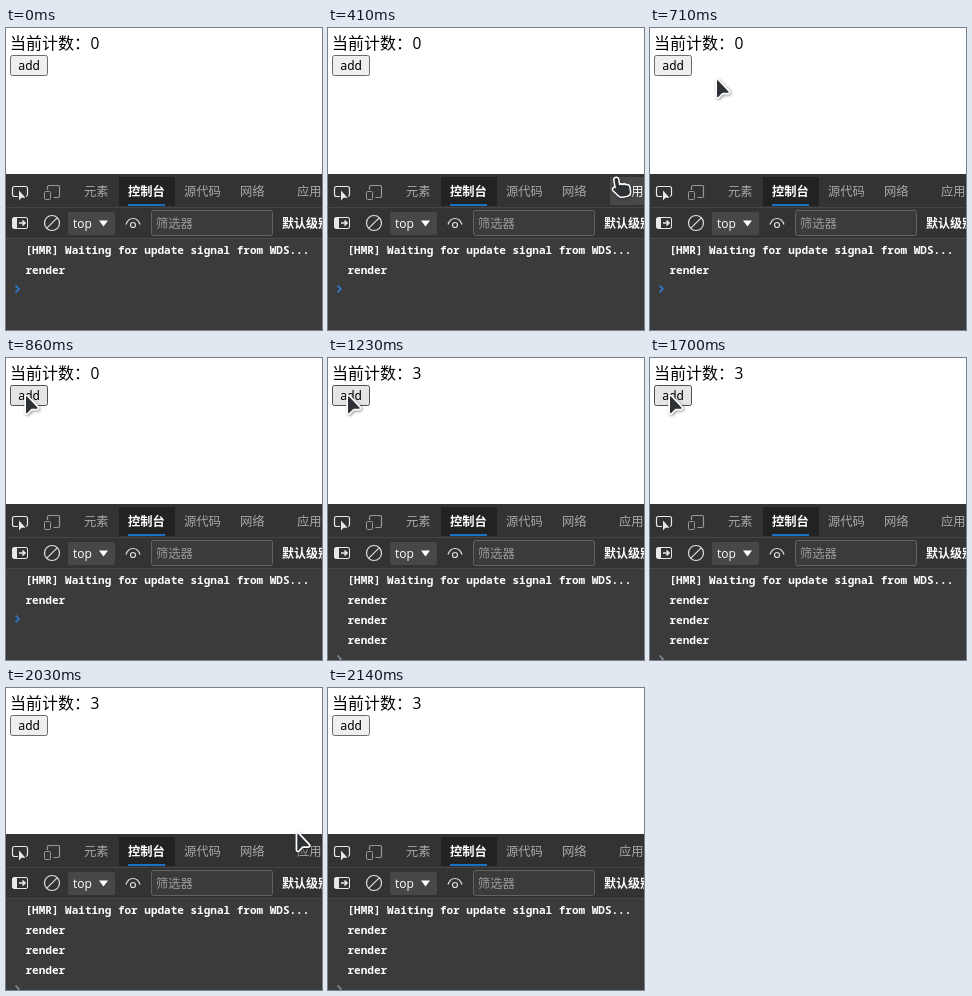
An HTML page with a canvas that plays this animation: 316x302 px, repeating every 3.64 s.

```html
<!DOCTYPE html>
<html lang="zh-CN">
<head>
<meta charset="utf-8">
<title>Counter</title>
<style>
html, body { margin: 0; width: 100%; height: 100%; overflow: hidden; background: #fff; }
canvas { display: block; width: 100vw; height: 100vh; }
</style>
</head>
<body>
<canvas id="stage"></canvas>
<script>
const W = 316, H = 302, LOOP = 3640, STEP = 30;
const SANS = '"Open Sans", "Noto Sans CJK SC", "Noto Sans CJK", sans-serif';
const CJK = '"Noto Sans CJK SC", "Noto Sans CJK", sans-serif';
const MONO = '"Noto Sans Mono", "DejaVu Sans Mono", monospace';

const canvas = document.getElementById('stage');
const ctx = canvas.getContext('2d');

// Pointer keys: time, x, y
const enter = [[410, 288, 150], [470, 236, 125], [560, 150, 88], [710, 67, 52], [800, 31, 41], [860, 20, 38]];
const leave = [[1680, 20, 38], [1740, 46, 45], [1810, 130, 65], [1890, 238, 90], [1980, 283, 133], [2060, 300, 164], [2130, 312, 186]];

function slope(keys, i, axis) {
  const a = keys[Math.max(i - 1, 0)], b = keys[Math.min(i + 1, keys.length - 1)];
  return (b[axis] - a[axis]) / (b[0] - a[0]);
}

function follow(keys, t) {
  const last = keys.length - 1;
  if (t <= keys[0][0]) return keys[0].slice(1);
  if (t >= keys[last][0]) return keys[last].slice(1);
  let i = 0;
  while (t >= keys[i + 1][0]) i++;
  const a = keys[i], b = keys[i + 1], d = b[0] - a[0], u = (t - a[0]) / d;
  const u2 = u * u, u3 = u2 * u;
  return [1, 2].map(k =>
    (2 * u3 - 3 * u2 + 1) * a[k] + (3 * u2 - 2 * u3) * b[k] +
    d * ((u3 - 2 * u2 + u) * slope(keys, i, k) + (u3 - u2) * slope(keys, i + 1, k)));
}

function pointerAt(t) {
  if (t < 410 || t >= 2140) return null;
  if (t < 1700) return follow(enter, 410 + Math.floor((t - 410) / STEP) * STEP);
  return follow(leave, Math.floor(t / STEP) * STEP);
}

function text(str, x, y, size, color, family = SANS, weight = 400) {
  ctx.font = `${weight} ${size}px ${family}`;
  ctx.fillStyle = color;
  ctx.fillText(str, x, y);
}

function rect(x, y, w, h, color) {
  ctx.fillStyle = color;
  ctx.fillRect(x, y, w, h);
}

function box(x, y, w, h, r, fill, line) {
  ctx.beginPath();
  ctx.roundRect(x, y, w, h, r);
  if (fill) { ctx.fillStyle = fill; ctx.fill(); }
  if (line) { ctx.strokeStyle = line; ctx.lineWidth = 1; ctx.stroke(); }
}

function stroke(d, color, width = 1.2) {
  ctx.strokeStyle = color;
  ctx.lineWidth = width;
  ctx.stroke(new Path2D(d));
}

function fill(d, color) {
  ctx.fillStyle = color;
  ctx.fill(new Path2D(d));
}

function drawPage(t, hover) {
  rect(0, 0, W, 146, '#fff');
  text('当前计数：', 4, 21, 16, '#000', CJK, 300);
  text(t < 1080 ? '0' : '3', 84.5, 21, 15.5, '#000');
  const pressed = hover && t >= 960 && t < 1080;
  const [face, edge] = pressed ? ['#f5f5f5', '#8d8d8d'] : hover ? ['#e5e5e5', '#4f4f4f'] : ['#efefef', '#6b6b6b'];
  box(4.5, 27.5, 37, 20, 2, face, edge);
  text('add', 12, 42, 12.2, '#000', MONO);
}

function drawTabs(hover) {
  rect(0, 146, W, 33, '#333');
  rect(113, 149, 56, 29, '#222');
  if (hover) rect(282, 149, 34, 28, '#484848');
  const tabs = [['元素', 78], ['控制台', 122], ['源代码', 178], ['网络', 234], ['应用', 291]];
  for (const [label, x] of tabs) {
    const on = x === 122;
    const color = on || (hover && x === 291) ? '#fff' : '#a8a8a8';
    text(label, x, 168, 12.3, color, CJK, on ? 700 : 400);
  }
  rect(122, 176, 37, 2, '#1b72c5');

  // Inspect and device icons
  stroke('M12 168.5H8.5Q6.5 168.5 6.5 166.5V160.5Q6.5 158.5 8.5 158.5H19.5Q21.5 158.5 21.5 160.5V166.5Q21.5 168 20 168.5', '#e8e8e8');
  fill('M13 162.5V172.5L15.5 169.8H19.5Z', '#e8e8e8');
  stroke('M41.5 162V159Q41.5 157.5 43 157.5H52Q53.5 157.5 53.5 159V168Q53.5 169.5 52 169.5H47.5', '#999');
  box(38.5, 163.5, 6, 8, 1, null, '#999');
}

function drawToolbar() {
  rect(0, 179, W, 32, '#333');
  rect(0, 179, W, 1, '#444');
  rect(0, 210, W, 1, '#484848');

  box(6.5, 189.5, 15, 11, 1.5, null, '#e8e8e8');
  rect(7, 190, 4, 10, '#e8e8e8');
  stroke('M13 195H19M16.5 192.5L19 195L16.5 197.5', '#e8e8e8', 1.6);
  stroke('M53.5 195A7.5 7.5 0 1 1 38.5 195A7.5 7.5 0 1 1 53.5 195M40.8 200.2L51.2 189.8', '#e0e0e0');

  box(62, 184, 47, 23, 2, '#474747');
  text('top', 67, 200, 12, '#fff', SANS, 500);
  fill('M93 192.5H102L97.5 198.5Z', '#fff');

  stroke('M120 196.5Q122 190.5 127 190.5T134 196.5', '#ddd');
  stroke('M129.5 197A2.5 2.5 0 1 1 124.5 197A2.5 2.5 0 1 1 129.5 197', '#ddd');

  box(145.5, 182.5, 121, 25, 2, '#3b3b3b', '#626262');
  text('筛选器', 150, 200, 12.3, '#999', CJK);
  text('默认级别', 276, 200, 12, '#fff', CJK, 700);
}

function drawConsole(t) {
  rect(0, 211, W, H - 211, '#3b3b3b');
  const done = t >= 1110;
  const lines = ['[HMR] Waiting for update signal from WDS...'].concat(Array(done ? 3 : 1).fill('render'));
  lines.forEach((line, i) => text(line, 19.5, 226 + i * 20, 11, '#fff', MONO, 600));
  const y = 221 + lines.length * 20;
  stroke(`M9.5 ${y - 3.5}L13 ${y}L9.5 ${y + 3.5}`, t >= 1230 ? '#777f88' : '#2f74c0', 1.8);
}

const ARROW = 'M0 .5V16.5Q.4 17.8 1.5 16.7L4.6 13.4Q5.2 12.8 6 12.8H11Q12.4 12.6 11.4 11.5L1 .6Q0 0 0 .5Z';
const HAND = 'M-2 2Q-2 0 0 0T2 2V9Q4 7.5 5.7 9.4Q8 8.2 9.5 10.2Q13 9.6 13 13V17Q13 22 8 22H3.5Q1 22 -.5 19.5L-5 13.5Q-6 11.5 -4.2 10.8Q-3 10.5 -2 12Z';

function drawPointer(x, y, hand) {
  const shape = new Path2D(hand ? HAND : ARROW);
  ctx.save();
  ctx.translate(x, y);
  if (hand) {
    ctx.rotate(-.17);
    ctx.scale(.88, .88);
  }
  ctx.lineJoin = 'round';
  ctx.shadowColor = 'rgba(0,0,0,.4)';
  ctx.shadowBlur = 3;
  ctx.shadowOffsetX = ctx.shadowOffsetY = 1;
  ctx.strokeStyle = '#fff';
  ctx.lineWidth = 3.4;
  ctx.stroke(shape);
  ctx.shadowColor = 'transparent';
  ctx.fillStyle = '#2d3136';
  ctx.fill(shape);
  ctx.restore();
}

function draw(t) {
  const p = pointerAt(t);
  const over = (x0, y0, x1, y1) => !!p && p[0] >= x0 && p[0] <= x1 && p[1] >= y0 && p[1] <= y1;
  const onTab = over(282, 147, W, 178);
  drawPage(t, over(4, 27, 42, 48));
  drawTabs(onTab);
  drawToolbar();
  drawConsole(t);
  if (p) drawPointer(p[0], p[1], onTab);
}

function frame() {
  const dpr = window.devicePixelRatio || 1;
  const w = Math.round(innerWidth * dpr), h = Math.round(innerHeight * dpr);
  if (canvas.width !== w || canvas.height !== h) {
    canvas.width = w;
    canvas.height = h;
  }
  ctx.setTransform(w / W, 0, 0, h / H, 0, 0);
  draw(performance.now() % LOOP);
  requestAnimationFrame(frame);
}
frame();
</script>
</body>
</html>
```
